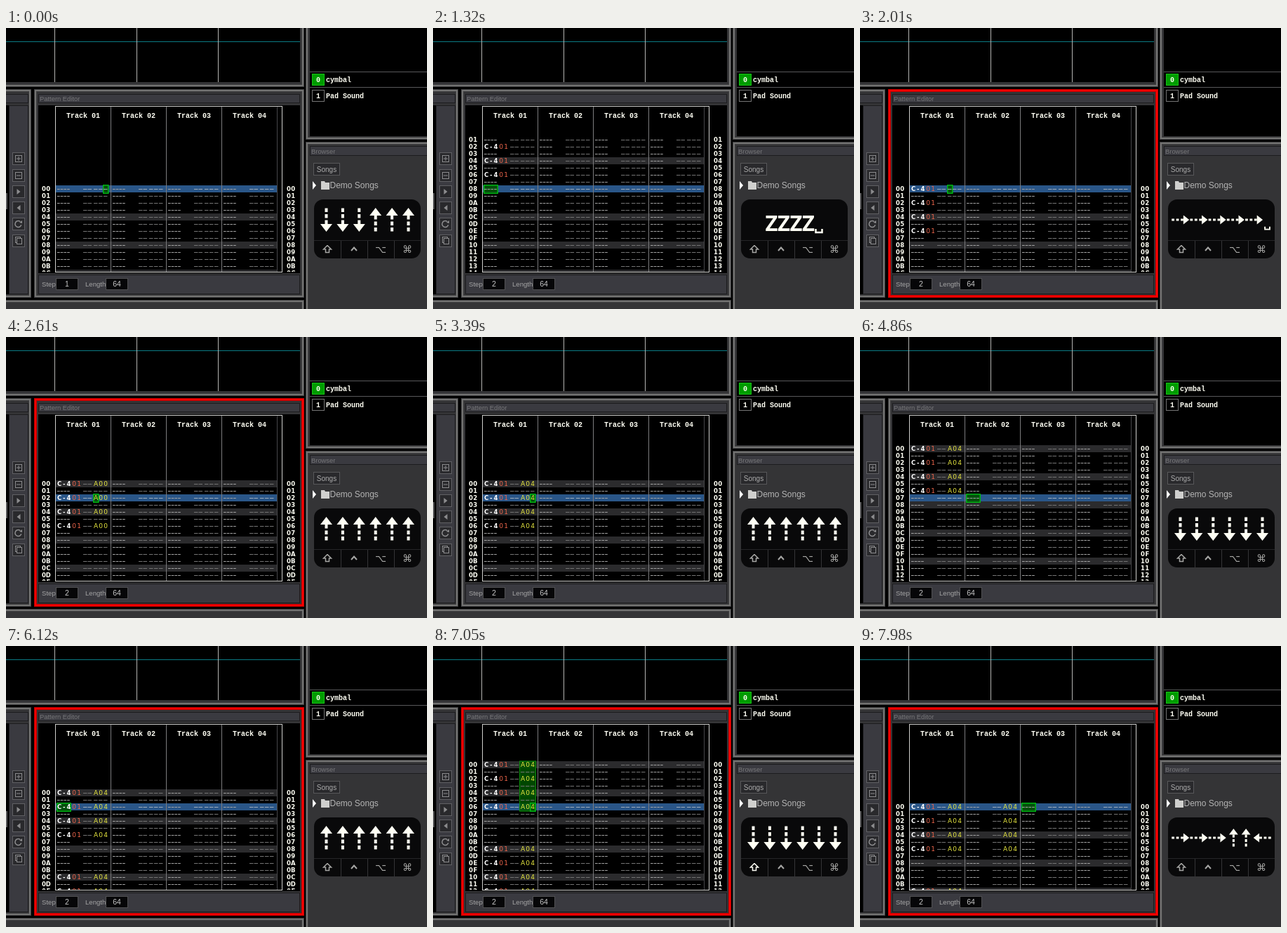
An HTML page with a canvas that plays this animation: 600 px wide and 400 px high, repeating every 8000 ms.

```html
<!DOCTYPE html>
<html lang="en">
<head>
<meta charset="utf-8">
<title>Pattern editor</title>
<style>
  html, body { margin: 0; width: 100%; height: 100%; overflow: hidden; background: #000; }
  canvas { display: block; width: 600px; height: 400px; }
</style>
</head>
<body>
<canvas id="stage" width="600" height="400"></canvas>
<script>
const ctx = document.getElementById('stage').getContext('2d');
const LOOP = 8000, COLS = 8, ROW_H = 10, CURSOR_Y = 229;
const PANEL = '#343436', BAR = '#3a3a40', SHADE = '#1c1c1e', EDGE = '#58585a';
const WHITE = '#fffff4', DIM = '#78787a';
const SANS = '"Liberation Sans", Arial, sans-serif';
const MONO = 'bold 10px "Liberation Mono", monospace';
const PIXEL = '"DejaVu Sans", sans-serif';
const COL_X = [73, 94, 101, 110, 116.5, 125, 132, 139];

// Start, keys, interval. Lower case arrows move, upper case ones select.
// _ toggles editing, S sets the step, c copies, v pastes.
const SCRIPT = [
  [30, 'lllllll', 60], [480, 'S'], [570, '_'],
  [840, 'ZZZZ_', 120], [1410, 'uuuuuuuurrr', 30],
  [1860, 'rr', 30], [1950, '_'], [2040, 'AAAA', 90], [2460, 'uuuuuuuu', 30],
  [2730, 'rr', 30], [2820, '4444', 90], [3180, '_'],
  [3240, 'uuuuuuuulllllll', 30], [3690, 'RRRRRRRDDDDDD', 30], [4110, 'c'],
  [4410, 'ruuuuuu', 30], [4680, 'dddddddddddd', 30], [5100, 'llllllll', 45],
  [5520, '_'], [5640, 'v'], [5790, 'uuuuuuuuuuuuuu', 30],
  [6240, 'rrrrr', 60], [6570, 'RRDDDDDD', 60], [7080, 'c'],
  [7140, 'uuuuuu', 30], [7350, 'rrrrrr', 45], [7650, 'v'],
  [7710, 'rrrr', 45], [7920, 'uul', 30]
];
const EVENTS = SCRIPT.flatMap(([start, keys, gap = 0]) =>
  [...keys].map((key, i) => ({ key, time: start + i * gap })));
const MOVES = { l: [0, -1], r: [0, 1], u: [-1, 0], d: [1, 0] };

function press(s, key) {
  const move = MOVES[key.toLowerCase()];
  const shift = move && key !== key.toLowerCase();
  const put = (col, value) => s.cells.set(s.row * 32 + col, value);
  if (move) {
    if (!shift) s.anchor = null;
    else s.anchor = s.anchor || [s.row, s.col];
    s.row = Math.max(0, s.row + move[0]);
    s.col = Math.max(0, s.col + move[1]);
  } else if (key === '_') s.edit = !s.edit;
  else if (key === 'S') s.step = 2;
  else if (key === 'c') copy(s);
  else if (key === 'v') {
    s.clip.forEach(([r, c, value]) => s.cells.set((s.row + r) * 32 + s.col + c, value));
    s.row += s.step;
  } else {
    if (key === 'Z') ['C-4', '0', '1'].forEach((v, i) => put(s.col + i, v));
    else if (key === 'A') ['A', '0', '0'].forEach((v, i) => put(s.col + i, v));
    else put(s.col, key);
    s.row += s.step;
  }
  s.mod = shift ? 0 : 'Scv'.includes(key) ? 3 : -1;
  if (s.mod === 3) s.keys = [];
  else s.keys = [...s.keys, move ? key.toLowerCase() : key].slice(-6);
}

function copy(s) {
  const [top, left] = s.anchor;
  s.clip = [];
  for (let r = top; r <= s.row; r++)
    for (let c = left; c <= s.col; c++)
      s.clip.push([r - top, c - left, s.cells.get(r * 32 + c)]);
}

function stateAt(time) {
  const s = { row: 0, col: 7, step: 1, edit: false, cells: new Map(), clip: [],
    anchor: null, keys: [...'ddduuu'], mod: -1 };
  let last = 0;
  for (const e of EVENTS) {
    if (e.time > time) break;
    if (e.time - last > 150) s.keys = [];
    press(s, e.key);
    last = e.time;
  }
  if (time - last > 100) s.mod = -1;
  return s;
}

function box(x, y, w, h, fill, stroke, width = 1) {
  if (fill) { ctx.fillStyle = fill; ctx.fillRect(x, y, w, h); }
  if (stroke) {
    ctx.strokeStyle = stroke;
    ctx.lineWidth = width;
    ctx.strokeRect(x + width / 2, y + width / 2, w - width, h - width);
  }
}

function label(text, x, y, font, color, align = 'left') {
  ctx.font = font;
  ctx.fillStyle = color;
  ctx.textAlign = align;
  ctx.fillText(text, x, y);
}

function line(points, color, width = 1) {
  ctx.strokeStyle = color;
  ctx.lineWidth = width;
  ctx.beginPath();
  points.forEach(([x, y]) => ctx.lineTo(x, y));
  ctx.stroke();
}

function shape(points, color) {
  ctx.fillStyle = color;
  ctx.beginPath();
  points.forEach(([x, y]) => ctx.lineTo(x, y));
  ctx.fill();
}

function panel(x, y, w, h, red) {
  box(x, y, w, h, PANEL, red ? '#c00000' : '#3e3e40', 4);
  box(x + 1, y + 1, w - 2, h - 2, null, red ? '#ff0000' : '#737372', 2);
}

function titleBar(x, y, w, h, text) {
  box(x, y, w, h, BAR, SHADE);
  label(text, x + 2, y + h - 3, `9.4px ${SANS}`, DIM);
}

function drawScope() {
  panel(-6, -6, 431, 90);
  box(0, 0, 419, 77, '#000');
  line([[0, 19.5], [419, 19.5]], '#0a7a84');
  [69, 186, 302].forEach(x => box(x, 0, 1, 77, '#b4b4b2'));
}

function drawInstruments() {
  panel(427, -6, 180, 165);
  box(433, 0, 167, 154, '#000');
  box(433, 62, 167, 1, EDGE);
  box(433, 84, 167, 1, EDGE);
  ['cymbal', 'Pad Sound'].forEach((name, i) => {
    const y = 65 + i * 23;
    box(436, y, 18, 17, i ? '#000' : '#009c00', i ? '#747474' : '#18c418');
    label(i, 445, y + 12, MONO, WHITE, 'center');
    label(name, 456, y + 12, MONO, WHITE);
  });
}

function drawTools() {
  panel(-6, 87, 42, 297);
  titleBar(-4, 94, 36, 13, '');
  box(0, 110, 4, 269, '#000');
  box(4, 110, 28, 269, BAR, SHADE);
  box(0, 235, 2, 23, EDGE);
  const icon = '#8c8c8e';
  [186, 210, 233, 256, 279, 303].forEach((y, i) => {
    box(9, y - 9, 18, 18, '#29292c', '#606064');
    if (i < 2) {
      box(13, y - 5, 10, 10, null, icon);
      box(15, y - .5, 6, 1, icon);
      if (!i) box(17.5, y - 3, 1, 6, icon);
    } else if (i < 4) {
      const d = i === 2 ? 2.5 : -2.5;
      shape([[18 - d, y - 4], [18 + d, y], [18 - d, y + 4]], icon);
    } else if (i === 4) {
      ctx.strokeStyle = icon;
      ctx.lineWidth = 1.5;
      ctx.beginPath();
      ctx.arc(17.5, y, 4.5, .3, 5.4);
      ctx.stroke();
      shape([[19, y - 2], [23, y - 5], [23, y - 1]], icon);
    } else {
      box(13, y - 6, 8, 9, null, icon);
      box(15, y - 4, 8, 9, '#29292c', icon);
    }
  });
}

const rowY = (s, row) => CURSOR_Y + (row - s.row) * ROW_H;
const colX = col => COL_X[col % COLS] + Math.floor(col / COLS) * 79;
const colWidth = col => col % COLS ? 8.5 : 21;

function drawRow(s, row) {
  const y = rowY(s, row), current = row === s.row;
  const number = row.toString(16).toUpperCase().padStart(2, '0');
  [51, 400].forEach(x => [...number].forEach((c, i) =>
    label(c, x + 3 + i * 6.3, y + 3, `bold 8.5px ${PIXEL}`, WHITE, 'center')));
  for (let col = 0; col < 4 * COLS; col++) {
    const part = col % COLS, x = colX(col);
    const value = s.cells.get(row * 32 + col);
    if (value) {
      const color = part === 0 ? '#fff' : part < 3 ? '#f0664c' : '#e6e640';
      [...value].forEach((c, i) => label(c, x + 3.2 + i * 6.6, y + 3,
        `${part ? '9px' : 'bold 8.5px'} ${PIXEL}`, color, 'center'));
    } else if (part === 0) {
      for (let i = 0; i < 4; i++) box(x + i * 4.7, y, 3.7, 1, '#a2a2a2');
    } else if (part > 2) box(x, y, 5.5, 1, current ? '#a0acb8' : '#747474');
  }
}

function drawSelection(s) {
  if (s.anchor) {
    const [row, col] = s.anchor, left = colX(col) - 2, top = rowY(s, row) - 5.5;
    box(left, top, colX(s.col) + colWidth(s.col) - left - .5,
      CURSOR_Y + 6.5 - top, 'rgba(0,84,0,.85)', '#0c8c0c');
  }
  box(colX(s.col) - 1, 223, colWidth(s.col), 13, 'rgba(0,80,0,.9)', '#00b414', 1.5);
}

function drawPattern(s) {
  panel(40, 87, 385, 297, s.edit);
  titleBar(46, 94, 373, 13, 'Pattern Editor');
  box(46, 110, 373, 239, '#000');
  ctx.save();
  ctx.beginPath();
  ctx.rect(46, 154, 373, 193);
  ctx.clip();
  const rows = [];
  for (let row = Math.max(0, s.row - 8); row < Math.min(64, s.row + 13); row++) rows.push(row);
  rows.filter(row => row === s.row || row % 4 === 0).forEach(row =>
    box(71, rowY(s, row) - 5, 315, 10, row === s.row ? '#2a5688' : '#2b2b2d'));
  drawSelection(s);
  rows.forEach(row => drawRow(s, row));
  ctx.restore();
  for (let i = 0; i < 4; i++) {
    box(149 + i * 79, 112, 1, 235, i < 3 ? '#7c7c7e' : '#48484a');
    label(`Track 0${i + 1}`, 110 + i * 79, 128, MONO, WHITE, 'center');
  }
  box(70, 111, 324, 237, null, '#cfcfcd');

  box(46, 351, 373, 28, BAR, SHADE);
  [['Step', 51, 71, s.step], ['Length', 113, 142, 64]].forEach(([name, x, fx, value]) => {
    label(name, x, 368, `9.6px ${SANS}`, '#a4a4a4');
    box(fx, 356, 32, 17, '#060608', '#505052');
    label(value, fx + 16, 368, `10.5px ${SANS}`, '#c8c8c8', 'center');
  });
}

function drawBrowser() {
  panel(427, 162, 180, 250);
  titleBar(433, 168, 170, 14, 'Browser');
  box(433, 185, 167, 215, PANEL);
  box(438, 192, 38, 18, '#29292c', '#58585a');
  label('Songs', 457, 205, `10px ${SANS}`, '#acacac', 'center');
  shape([[437, 218], [442, 224], [437, 230]], '#fff');
  shape([[449, 218], [454, 218], [455, 220], [461, 220], [461, 230], [449, 230]], '#d0d0ce');
  label('Demo Songs', 461.5, 227.5, `12px ${SANS}`, '#b4b4b4');
}

const keyWidth = key => 'ud'.includes(key) ? 23.4 : 'lr'.includes(key) ? 34.6
  : key === '_' ? 12.5 : 17.5;

function drawArrow(key) {
  ctx.save();
  ctx.rotate({ u: 0, r: 1, d: 2, l: 3 }[key] * Math.PI / 2);
  const reach = 'lr'.includes(key) ? 15 : 17;
  shape([[0, -reach], [8.5, 11 - reach], [-8.5, 11 - reach]], WHITE);
  [0, 8.5, 17].forEach(d => box(-2, 11 - reach + d, 4, reach === 15 ? 5 : 5.5, WHITE));
  ctx.restore();
}

function drawKeys(s) {
  ctx.save();
  ctx.beginPath();
  ctx.roundRect(439, 244, 152, 84, 13);
  ctx.clip();
  box(439, 244, 152, 84, '#09090a');
  box(439, 302, 152, 1, '#262628');
  [477, 515, 553].forEach(x => box(x, 303, 1, 25, '#343436'));
  [...'⇧⌃⌥⌘'].forEach((c, i) => {
    const x = 458 + i * 38, color = i === s.mod ? WHITE : '#a6a6a4';
    if (i === 0) {
      line([[x, 309.5], [x + 5.5, 315], [x + 2.5, 315], [x + 2.5, 319.5],
        [x - 2.5, 319.5], [x - 2.5, 315], [x - 5.5, 315], [x, 309.5]], color, 1.5);
    } else if (i === 1) line([[x - 4, 317], [x, 312.5], [x + 4, 317]], color, 2);
    else label(c, x, 320, `14px ${PIXEL}`, color, 'center');
  });
  ctx.restore();

  const total = s.keys.reduce((sum, key) => sum + keyWidth(key), 0);
  const scale = Math.min(1, 140.5 / total);
  ctx.save();
  ctx.translate(515, 273);
  ctx.scale(scale, scale);
  ctx.translate(-total / 2, 0);
  for (const key of s.keys) {
    const w = keyWidth(key);
    ctx.translate(w / 2, 0);
    if ('udlr'.includes(key)) drawArrow(key);
    else if (key === '_') line([[-4.5, 13], [-4.5, 18], [4.5, 18], [4.5, 13]], WHITE, 2.5);
    else label(key, 0, 16, '600 31px "Noto Sans", sans-serif', WHITE, 'center');
    ctx.translate(w / 2, 0);
  }
  ctx.restore();
}

function draw(time) {
  const s = stateAt(time);
  box(0, 0, 600, 400, '#000');
  drawScope();
  drawInstruments();
  drawTools();
  drawPattern(s);
  panel(-6, 387, 431, 30);
  drawBrowser();
  drawKeys(s);
}

const start = performance.now();
function tick() {
  draw((performance.now() - start) % LOOP);
  requestAnimationFrame(tick);
}
tick();
</script>
</body>
</html>
```
